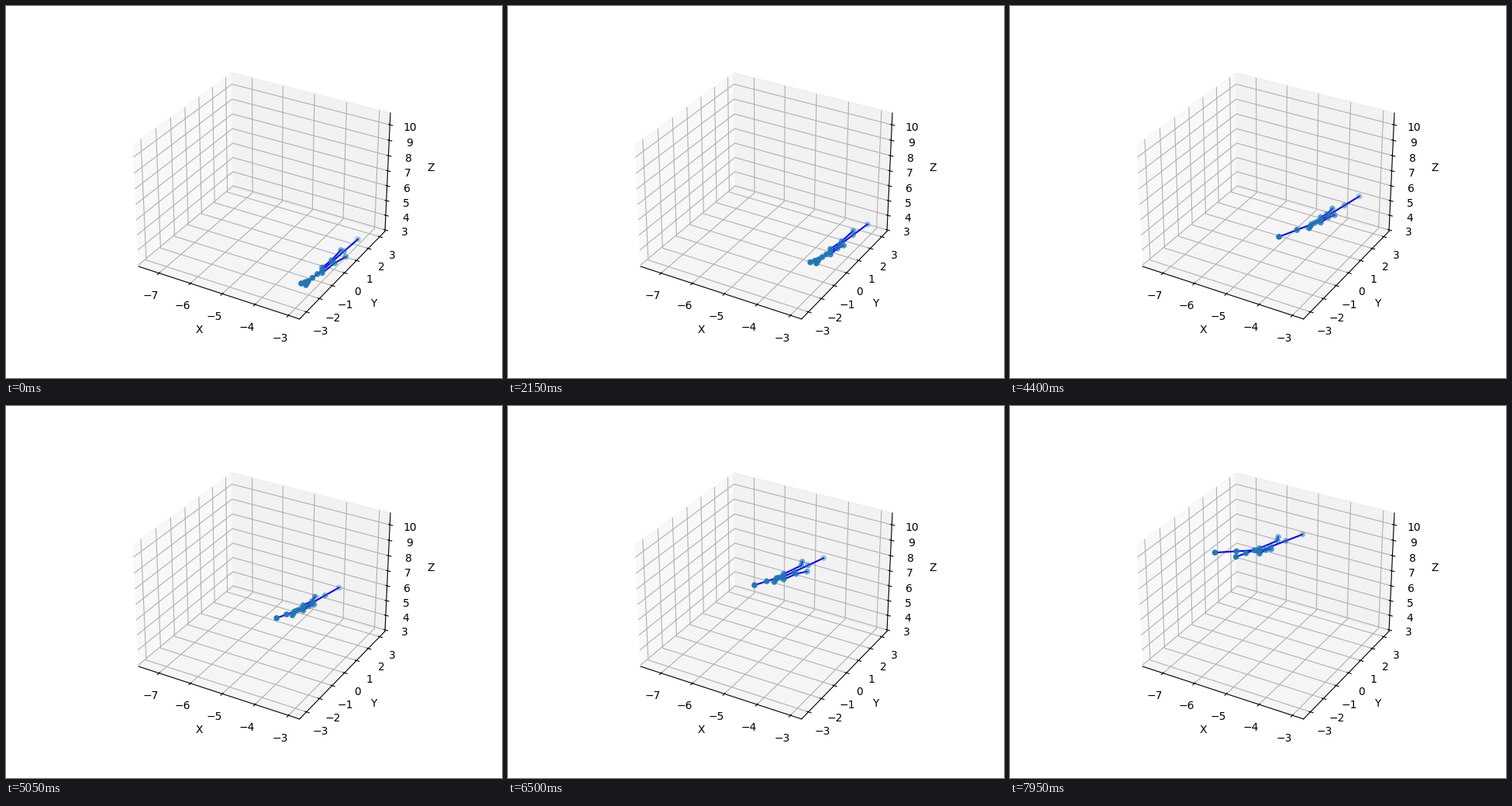
Animation of 640 by 480 pixels, one loop 8 s. Source, as a matplotlib script:

```python
import numpy as np
import matplotlib.pyplot as plt
from matplotlib.animation import FuncAnimation
from matplotlib.colors import to_rgb

FRAMES, STEP = 160, 50
BLUE = to_rgb("tab:blue")


def vec(x, y):
    return np.array([x, y], float)


def mix(a, b, k):
    return a + (b - a) * k


def pulse(t, peak, width, x, y):
    """A reach by (x, y) that swells and fades around its peak time."""
    return vec(x, y) * np.exp(-((t - peak) / width) ** 2 / 2)


def hip_at(t):
    keys = [0, 2.15, 3.55, 4.4, 5.7, 7.25, 7.95]
    return vec(np.interp(t, keys, [408, 416, 400, 401, 366, 346, 322]),
               np.interp(t, keys, [341, 317, 308, 276, 245, 197, 187]))


def pose(t):
    """Chains of joints in stage pixels at t seconds."""
    u = t / 8
    hip = hip_at(t)
    chest = hip + vec(-18 + 11 * u, 14 - 15 * u)

    toe = (hip + vec(46, -40 + 22 * u)
           + pulse(t, 3.35, 0.5, 34, -23) + pulse(t, 7.3, 0.45, 27, -9))
    ankle = mix(hip, toe, 0.61)

    tip = (hip + vec(24, -26 + 8 * u)
           + pulse(t, 3.2, 0.7, 17, -10) + pulse(t, 4.6, 0.5, -14, 10))
    folded = 1 / (1 + np.exp(-6 * (t - 5)))
    bend = mix(hip, tip, 0.5 + 0.45 * folded) + vec(0, 4 * folded)

    stride = 24 + 9 * np.cos(2 * np.pi * t / 3.3)
    heel = hip + stride * vec(0.92, -0.53 + 0.4 * u)

    hand = (chest + vec(-9, 3) + pulse(t, 4, 0.75, -38, 15)
            + pulse(t, 6.75, 0.25, -32, 10) + pulse(t, 8.1, 0.3, -47, 0))
    wrist = chest + vec(-3, 5) + pulse(t, 8.1, 0.3, -23, 4)

    side = vec(0, 3.5)
    return [
        [hip, mix(hip, ankle, 0.43), ankle, toe],
        [hip - side, bend, tip],
        [hip + side, mix(hip, heel, 0.53), heel],
        [hip, mix(hip, chest, 0.35), mix(hip, chest, 0.7), chest],
        [chest, mix(chest, hand, 0.45), hand],
        [chest, mix(chest, wrist, 0.45), wrist],
    ]


fig = plt.figure(figsize=(6.4, 4.8), dpi=100)
ax = fig.add_subplot(111, projection="3d")
ax.set_xlim(-7.665, -2.672, view_margin=0)
ax.set_ylim(-3.52, 3.47, view_margin=0)
ax.set_zlim(2.9, 10.75, view_margin=0)
ax.set_xlabel("X")
ax.set_ylabel("Y")
ax.set_zlabel("Z")

stage = fig.add_axes([0, 0, 1, 1])
stage.set_xlim(0, 640)
stage.set_ylim(480, 0)
stage.axis("off")

bones = [stage.plot([], [], color="b", lw=1.5)[0] for _ in pose(0)]
dots = stage.scatter([], [], s=20, zorder=3)


def draw(frame):
    chains = pose(frame * STEP / 1000)
    for bone, chain in zip(bones, chains):
        bone.set_data(*np.transpose(chain))
    pts = np.unique(np.concatenate(chains).round(3), axis=0)
    # farther joints lie to the upper right and fade
    depth = pts @ vec(1, -1.5)
    order = np.argsort(-depth)
    pts, depth = pts[order], depth[order]
    fade = 1 - 0.7 * (depth - depth.min()) / np.ptp(depth)
    rgba = [(*BLUE, a) for a in fade]
    dots.set_offsets(pts)
    dots.set_facecolor(rgba)
    dots.set_edgecolor(rgba)
    return [*bones, dots]


anim = FuncAnimation(fig, draw, frames=FRAMES, interval=STEP,
                     repeat=True, repeat_delay=0, blit=False)
plt.show()
```
